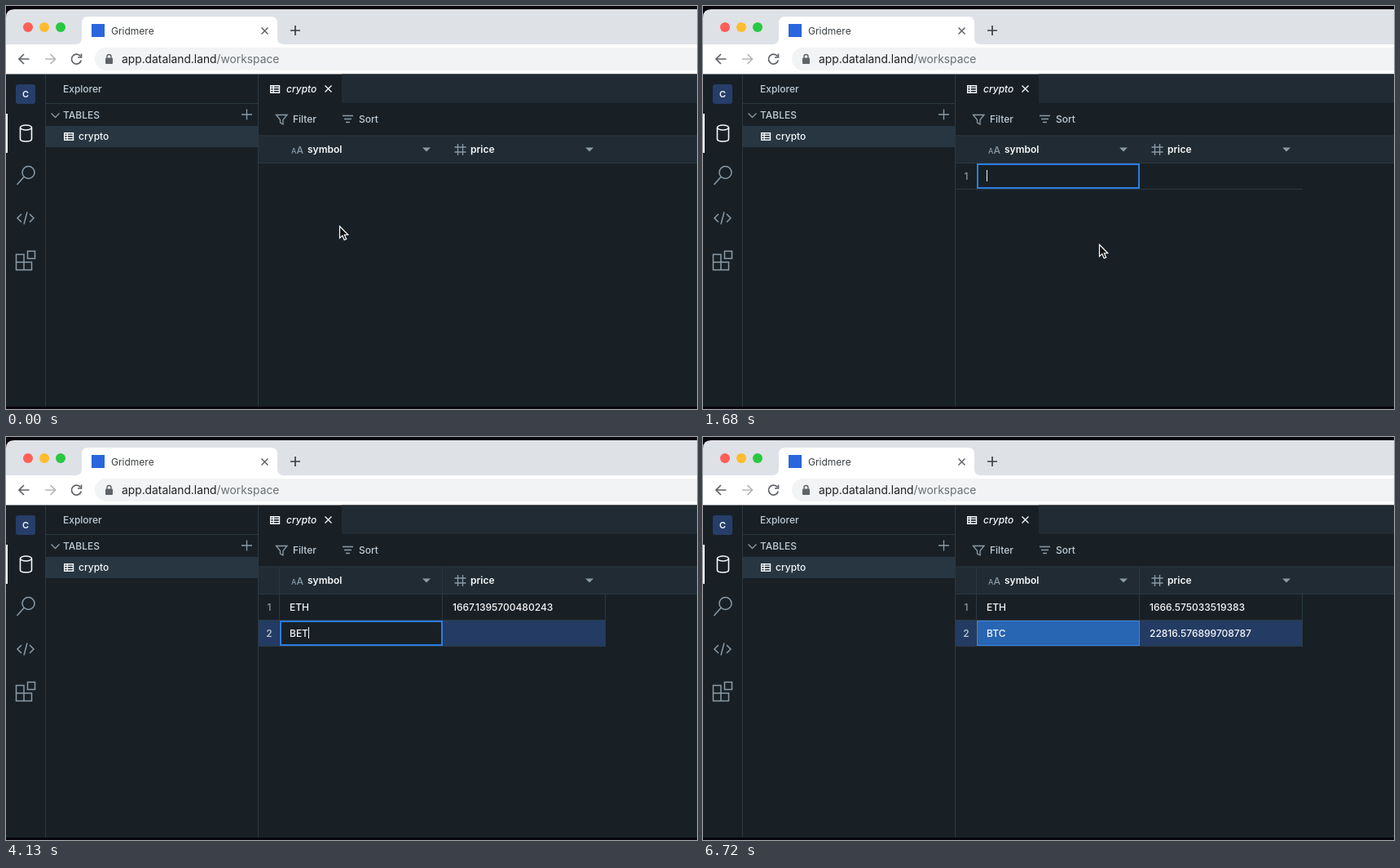
An HTML page for the animation above (6.86 s loop, 848 by 494 pixels).

```html
<!DOCTYPE html>
<html lang="en">
<head>
<meta charset="utf-8">
<title>Workspace table</title>
<style>
html, body { margin: 0; width: 100%; height: 100%; overflow: hidden; background: #09050f; }
svg { display: block; }
text { font: 500 12px Inter, sans-serif; fill: #f5f8fa; white-space: pre; }
.bold { font-weight: 600; }
.soft { fill: #bfccd6; }
.dim { fill: #8a9ba8; }
.line { fill: none; stroke: #8a9ba8; stroke-width: 1.3; }
.white { stroke: #f5f8fa; }
.rule { fill: none; stroke: #2c3841; }
.nav { fill: none; stroke: #5f6368; stroke-width: 1.7; }
.url { font-size: 13.8px; font-weight: 400; fill: #202124; }
.blur .tool { opacity: .55; }
</style>
</head>
<body>
<svg width="848" height="494" viewBox="0 0 848 494">
  <defs>
    <g id="table" fill="none" stroke="#f5f8fa" stroke-width="1.4">
      <path d="M.7.7h10.8v8.6H.7zM.7 3.4h10.8M.7 6.400h10.8M4.200 .7v8.6"/>
    </g>
    <path id="caret" d="M0 0h10l-5 5z" fill="#8a9ba8"/>
  </defs>

  <!-- browser frame -->
  <g id="chrome">
    <path id="strip" d="M0 84V14Q0 4 10 4H848V84Z"/>
    <g id="lights"><circle cx="27" cy="26" r="6"/><circle cx="47" cy="26" r="6"/><circle cx="67" cy="26" r="6"/></g>
    <path d="M85 47Q93 47 93 39V21Q93 13 101 13H325Q333 13 333 21V39Q333 47 341 47Z" fill="#fff"/>
    <rect y="47" width="848" height="36.5" fill="#fff"/>
    <rect x="105" y="22" width="16" height="16" fill="#2a66dc"/>
    <text id="title" x="129" y="34.5" style="font-weight:400">Gridmere</text>
    <path class="nav" d="M313.500 26.500l8 8m0-8l-8 8" style="stroke-width:1.5"/>
    <path class="nav" d="M349 30h12m-6-6v12" style="stroke:#3c4043"/>
    <path class="nav tool" d="M28.500 65H16m6-6l-6 6 6 6"/>
    <path class="nav tool" d="M48 65h12.500m-6-6l6 6-6 6" style="stroke:#b4b6b9"/>
    <path class="nav tool" d="M91.300 61.500A6 6 0 1 0 92.300 66.500M92.500 58.500v4.500h-4.500"/>
    <path d="M123 51H848V79H123a14 14 0 0 1 0-28z" fill="#f1f3f4"/>
    <rect x="122" y="63.500" width="9" height="7.500" rx="1" fill="#5f6368"/>
    <path class="nav" d="M124 64v-2a2.500 2.500 0 0 1 5 0v2" style="stroke-width:1.4"/>
    <text class="url" x="142" y="70">app.dataland.land<tspan fill="#6b6f74">/workspace</tspan></text>
  </g>

  <!-- app panels -->
  <path d="M0 83.500H848V491H0z" fill="#182026"/>
  <path d="M412 83.500H848V119H412zM310 159H848V192H310z" fill="#202b33"/>
  <path d="M49 147H309V173H49z" fill="#273641"/>
  <path class="rule" d="M48.500 84V491M309.500 84V491M49 119.500H309M310 159H848M310 192.500H848"/>

  <!-- activity bar -->
  <rect x="12" y="96" width="24" height="24" rx="3" fill="#263e69"/>
  <text class="bold" x="24" y="112" text-anchor="middle" style="font-size:11px">C</text>
  <path d="M0 132h2v48H0z" fill="#fff"/>
  <g class="line white" style="stroke-width:1.6">
    <ellipse cx="24.500" cy="149" rx="7" ry="3"/>
    <path d="M17.500 149v14q0 3 7 3t7-3v-14"/>
  </g>
  <g class="line" style="stroke-width:1.5">
    <circle cx="27.500" cy="204" r="7.500"/><path d="M22 209.500L13.500 219"/>
    <path d="M19 255l-5 5 5 5M29 255l5 5-5 5M26 252.500l-4 15"/>
    <path d="M12.500 304.500h9.500v19h-9.500zM12.500 314h19v9.500h-19zM26.500 300.500h9v9h-9z"/>
  </g>

  <!-- explorer -->
  <text class="soft" x="70" y="106">Explorer</text>
  <path class="line" d="M55.500 131.500l5 5 5-5M289 133h13m-6.500-6.500v13"/>
  <text class="soft bold" x="70" y="138" style="font-weight:550">TABLES</text>
  <use href="#table" x="71" y="155"/>
  <text x="89" y="164">crypto</text>

  <!-- table tab, tools and headings -->
  <use href="#table" x="324" y="97"/>
  <text x="344" y="106" style="font-style:italic">crypto</text>
  <path class="line white" d="M391.500 97.500l8 8m0-8l-8 8"/>
  <path class="line" d="M331.500 133.500h13.500l-5 6v5.500l-3.500-2v-3.500z"/>
  <text class="soft" x="352" y="143">Filter</text>
  <path class="line" d="M413 134.500h13M415 138.500h9M417 142.500h5"/>
  <text class="soft" x="433" y="143">Sort</text>
  <text class="dim" x="350" y="181" style="font-size:9px">A<tspan style="font-size:12px">A</tspan></text>
  <text class="bold" x="370" y="180">symbol</text>
  <use href="#caret" x="511" y="173.500"/>
  <path class="line" d="M554.500 169v14M560.500 169v14M550.500 173h14M550.500 179h14"/>
  <text class="bold" x="570" y="180">price</text>
  <use href="#caret" x="711" y="173.500"/>

  <g id="rows"></g>
  <circle id="click" cx="409.500" cy="271" r="16" fill="#3d3726"/>
  <path id="mouse" d="M0 0V14.500L3.400 11.400L5.700 16.800L8.200 15.700L5.900 10.500H10.300Z" fill="#111" stroke="#fff" stroke-width="1.2"/>
</svg>
<script>
const LOOP = 6860, STEP = 70;
const el = id => document.getElementById(id);
const rows = el("rows"), mouse = el("mouse");

// latest value of a [time, value] timeline
const at = (keys, t) => keys.filter(k => k[0] <= t).pop()[1];
const within = (t, a, b) => t >= a && t < b;
const rect = (x, y, w, h, look) => `<rect x="${x}" y="${y}" width="${w}" height="${h}" ${look}/>`;

const table = [
  {
    from: 1400, select: [2170, 3780], edit: [1400, 2170],
    symbol: [[0, ""], [1820, "E"], [1890, "ET"], [1960, "ETH"]],
    price: [[0, ""], [2730, "1667.1395700480243"], [5320, "1666.575033519383"]]
  },
  {
    from: 3150, select: [3780, LOOP], edit: [3920, 4830],
    symbol: [[0, ""], [3920, "B"], [3990, "BE"], [4130, "BET"], [4340, "BE"], [4410, "B"], [4480, "BT"], [4620, "BTC"]],
    price: [[0, ""], [5320, "22816.576899708787"]]
  }
];

function drawRow(row, i, t) {
  if (t < row.from) return "";
  const y = 193 + 32 * i, base = y + 19.5;
  const selected = within(t, ...row.select), editing = within(t, ...row.edit);
  let out = "";
  if (selected) out += rect(310, y, 426, 31, 'fill="#243c63"');
  out += `<path class="rule" d="M310 ${y + 31.5}H736"/>`;
  if (t >= 3150) out += `<path class="rule" d="M335.5 ${y}v31M535.5 ${y}v31M735.5 ${y}v31"/>`;
  if (editing) out += rect(337, y + 1, 198, 29, 'fill="#182026" stroke="#2b7de0" stroke-width="2"');
  else if (selected) out += rect(336.5, y + .5, 199, 30, 'fill="#2865b3" stroke="#3d86dd"');
  out += `<text class="${selected ? "soft" : "dim"}" x="323" y="${base}" text-anchor="middle">${i + 1}</text>`;
  out += `<text class="symbol" x="348" y="${base}">${at(row.symbol, t)}</text>`;
  out += `<text x="548" y="${base}">${at(row.price, t)}</text>`;
  if (editing) out += `<path class="caret" d="M348.5 ${y + 8}v14" stroke="#f5f8fa"/>`;
  return out;
}

function moveMouse(t) {
  const path = [[0, 409.5, 270], [1120, 409.5, 270], [1540, 486.5, 292.5], [5530, 486.5, 292.5], [5670, 496.5, 389.5], [5950, 500, 500], [LOOP, 500, 500]];
  const n = path.findIndex(p => p[0] > t), [t0, x0, y0] = path[n - 1], [t1, x1, y1] = path[n];
  const u = (t - t0) / (t1 - t0), k = u * u * (3 - 2 * u);
  mouse.setAttribute("transform", `translate(${x0 + (x1 - x0) * k} ${y0 + (y1 - y0) * k})`);
  mouse.style.display = within(t, 1820, 5530) || t >= 5950 ? "none" : "";
}

function draw(t) {
  const blur = within(t, 490, 840);
  el("chrome").setAttribute("class", blur ? "blur" : "");
  el("strip").setAttribute("fill", blur ? "#e8e9ed" : "#dee1e6");
  el("title").style.fill = blur ? "#5f6368" : "#3c4043";
  [...el("lights").children].forEach((c, i) => {
    c.setAttribute("fill", blur ? "#d2d2d5" : ["#ff5f57", "#febc2e", "#28c840"][i]);
  });
  rows.innerHTML = (t >= 3150 ? '<path class="rule" d="M335.5 160v32M535.5 160v32"/>' : "")
    + table.map((row, i) => drawRow(row, i, t)).join("");
  const caret = rows.querySelector(".caret");
  if (caret) {
    const text = [...rows.querySelectorAll(".symbol")].pop();
    caret.setAttribute("transform", `translate(${Math.round(text.getComputedTextLength())} 0)`);
  }
  el("click").style.display = within(t, 630, 840) ? "" : "none";
  moveMouse(t);
}

const start = performance.now();
function tick() {
  const t = (performance.now() - start) % LOOP;
  draw(Math.floor(t / STEP) * STEP);
  requestAnimationFrame(tick);
}
tick();
</script>
</body>
</html>
```
